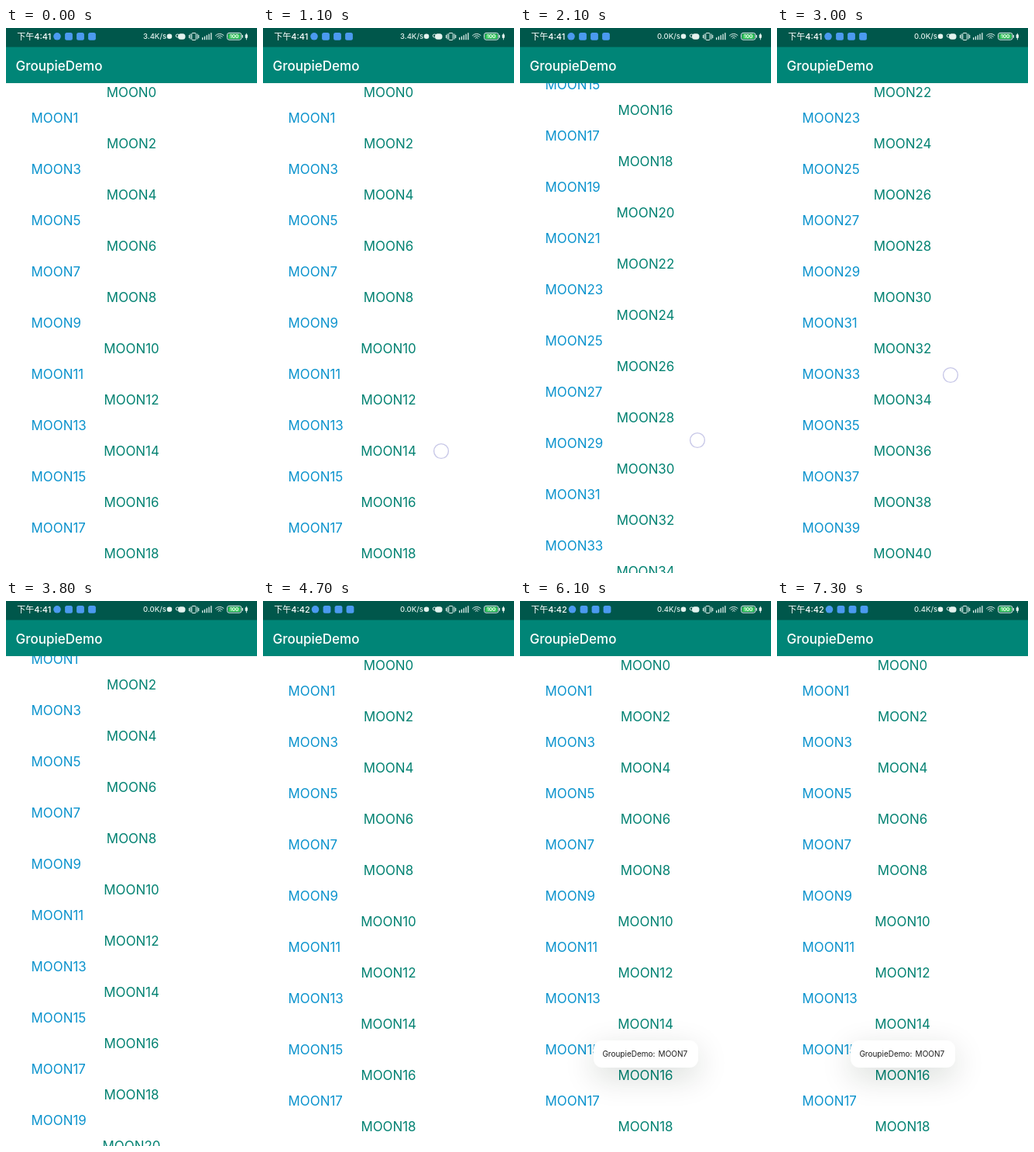
Write an HTML page with a canvas that moves like this. It is 324 by 702 pixels and loops after 7.4 s.

```html
<!DOCTYPE html>
<html lang="zh">
<head>
<meta charset="utf-8">
<title>GroupieDemo</title>
<style>
html, body { margin: 0; width: 100%; height: 100%; overflow: hidden; background: #fff; }
canvas { display: block; width: 324px; height: 702px; }
</style>
</head>
<body>
<canvas id="stage"></canvas>
<script>
const W = 324, H = 702, LOOP = 7400, STEP = 100;
const ROW = 33, ROWS = 41, HEADER = 71, END = 22 * ROW;
const HOLD = 300, TOAST = 5500;
const FONT = 'Inter, "Noto Sans CJK SC", "Noto Sans CJK", sans-serif';
const PALE = '#e4f2ee';
const canvas = document.getElementById('stage');
const c = canvas.getContext('2d');
const ratio = window.devicePixelRatio || 1;
canvas.width = W * ratio;
canvas.height = H * ratio;
c.scale(ratio, ratio);

// Each swipe starts under a finger and flings the list to an offset
const SWIPES = [
  { start: 1100, time: 1000, to: 505, x: 230, y: 545 },
  { start: 2100, time: 500, to: END, x: 229, y: 531 },
  { start: 3000, time: 1300, to: 0, x: 224, y: 447 }
];

const clamp = v => Math.max(0, Math.min(1, v));
const easeOut = p => 1 - (1 - clamp(p)) ** 3;

function scrollAt(t) {
  return SWIPES.reduce((at, s) => at + (s.to - at) * easeOut((t - s.start) / s.time), 0);
}

function text(s, x, y, size, color, weight = 400, align = 'left') {
  c.font = `${weight} ${size}px ${FONT}`;
  c.textAlign = align;
  c.fillStyle = color;
  c.fillText(s, x, y);
}

function box(x, y, w, h, r) {
  c.beginPath();
  c.roundRect(x, y, w, h, r);
}

function disc(x, y, r) {
  c.beginPath();
  c.arc(x, y, r, 0, 7);
}

function drawRows(offset) {
  for (let i = 0; i < ROWS; i++) {
    const y = 89 + i * ROW - offset;
    if (i % 2) text('MOON' + i, 32.6, y, 16.9, '#0b93cd');
    else text('MOON' + i, 162, y, 16.9, '#008171', 400, 'center');
  }
}

function drawStatus(t) {
  const late = t >= 4000, left = late ? 67.5 : 66;
  const speed = t < 1500 ? '3.4' : t < 5400 ? '0.0' : '0.4';
  text(late ? '下午4:42' : '下午4:41', 14.3, 14.9, 11, '#fff', 500);

  c.fillStyle = '#4b9af0';
  disc(left, 10.8, 4.8);
  c.fill();
  for (let i = 1; i < 4; i++) {
    box(left - 4.9 + i * 15, 6, 9.8, 9.8, 2.5);
    c.fill();
  }

  text(speed + 'K/s', 177, 14.3, 9.5, PALE, 500);
  c.fillStyle = c.strokeStyle = PALE;
  c.lineWidth = 1;
  disc(211, 10.8, 3.3);
  c.fill();

  // Cup
  box(222, 7.2, 9.5, 7.6, 3.5);
  c.fill();
  c.beginPath();
  c.ellipse(221.5, 10, 2.3, 2, 0, 0, 7);
  c.stroke();

  // Vibration
  box(239.8, 6.5, 5.4, 9, 1);
  c.stroke();
  for (const side of [-1, 1])
    for (let i = 0; i < 2; i++) {
      const h = 7 - 3 * i;
      c.fillRect(242.1 + side * (4.6 + 1.6 * i), 11 - h / 2, 1, h);
    }

  // Signal
  for (let i = 0; i < 5; i++) {
    const h = 3 + 1.5 * i;
    c.fillRect(253 + i * 2.8, 15.2 - h, 1.3, h);
  }

  // Wi-Fi
  for (let r = 2.5; r < 8; r += 2.5) {
    c.beginPath();
    c.arc(275.8, 15, r, -Math.PI * .77, -Math.PI * .23);
    c.stroke();
  }

  // Battery and charger
  box(285.5, 6.4, 18.4, 8.8, 2.5);
  c.stroke();
  c.fillRect(304.6, 9, 1.3, 3.6);
  box(308.7, 8.3, 3.2, 4.6, 1);
  c.fill();
  c.fillRect(309.9, 6.8, .9, 8.5);
  c.fillStyle = '#35c85c';
  box(286.7, 7.6, 16, 6.4, 1.5);
  c.fill();
  text('100', 294.7, 13.2, 6.6, '#fff', 600, 'center');
}

function drawHeader(t) {
  c.fillStyle = '#008577';
  c.fillRect(0, 0, W, HEADER);
  c.fillStyle = '#00574b';
  c.fillRect(0, 0, W, 24.5);
  text('GroupieDemo', 12.6, 54.5, 17, '#fff', 500);
  drawStatus(t);
}

function drawTouch(t, offset) {
  const swipe = SWIPES.find(s => t >= s.start && t < s.start + HOLD);
  if (!swipe) return;
  disc(swipe.x, swipe.y - offset + scrollAt(swipe.start), 9.4);
  c.fillStyle = 'rgba(255,255,255,.5)';
  c.fill();
  c.strokeStyle = '#c8c8e8';
  c.lineWidth = 1.4;
  c.stroke();
}

function drawToast(t) {
  if (t < TOAST) return;
  c.save();
  c.globalAlpha = clamp((t - TOAST + STEP) / 300);
  c.save();
  c.shadowColor = 'rgba(0,30,15,.16)';
  c.shadowBlur = 40 * ratio;
  c.shadowOffsetY = 12 * ratio;
  c.fillStyle = '#fff';
  box(95, 566, 135, 35, 11);
  c.fill();
  c.restore();
  text('GroupieDemo:', 106.4, 587.3, 10, '#1c1c1c');
  text('MOON7', 178.6, 587.3, 10, '#1c1c1c');
  c.restore();
}

function frame(now) {
  const t = Math.floor(now % LOOP / STEP) * STEP;
  const offset = scrollAt(t);
  c.fillStyle = '#fff';
  c.fillRect(0, 0, W, H);
  drawRows(offset);
  drawHeader(t);
  drawTouch(t, offset);
  drawToast(t);
  requestAnimationFrame(frame);
}
requestAnimationFrame(frame);
</script>
</body>
</html>
```
